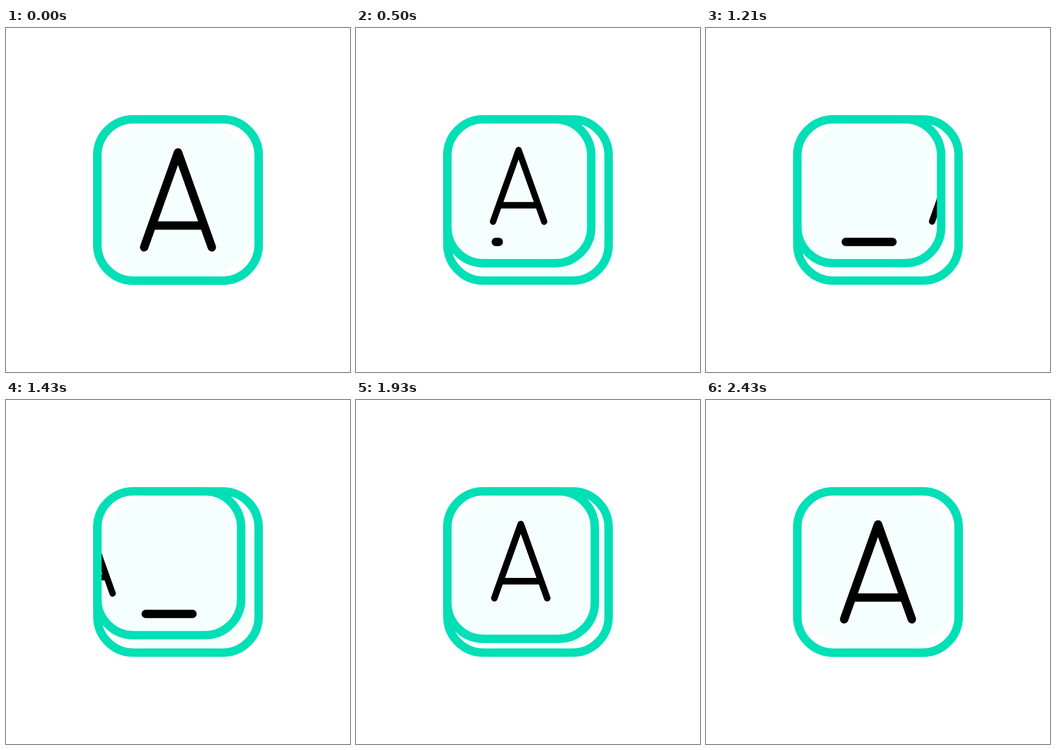
Write an HTML page with a canvas that moves like this. It is 640x640 px and loops after 2.78 s.

```html
<!DOCTYPE html>
<html lang="en">
<head>
<meta charset="utf-8">
<title>Text resize icon</title>
<style>
  html, body { margin: 0; width: 100%; height: 100%; overflow: hidden; background: #fff; }
  canvas { display: block; }
</style>
</head>
<body>
<canvas width="640" height="640"></canvas>
<script>
const ctx = document.querySelector('canvas').getContext('2d');
const LOOP = 2780, TEAL = '#00dfb6', PALE = '#f5fffd';

// Eased progress from 0 to 1 between two times
const ease = (t, start, end) => {
  const p = Math.min(1, Math.max(0, (t - start) / (end - start)));
  return (1 - Math.cos(Math.PI * p)) / 2;
};
// Rises in the first interval and falls back in the second
const pulse = (t, a, b, c, d) => ease(t, a, b) - ease(t, c, d);

function tile(size) {
  ctx.beginPath();
  ctx.roundRect(170, 170, size, size, 67);
}

function border(size) {
  tile(size);
  ctx.strokeStyle = TEAL;
  ctx.lineWidth = 15.7;
  ctx.stroke();
}

function disc() {
  ctx.beginPath();
  ctx.arc(320, 320, 158, 0, 2 * Math.PI);
  ctx.fillStyle = PALE;
  ctx.fill();
}

function letter(x, y, scale) {
  ctx.save();
  ctx.translate(x, y);
  ctx.scale(scale, scale);
  ctx.beginPath();
  ctx.moveTo(-63, 88.5);
  ctx.lineTo(0, -88);
  ctx.lineTo(63, 88.5);
  ctx.moveTo(-48, 48);
  ctx.lineTo(48, 48);
  ctx.lineWidth = 15.7;
  ctx.stroke();
  ctx.restore();
}

function underline(from, to) {
  if (to - from < 0.001) return;
  ctx.beginPath();
  ctx.moveTo(260 + 87 * from, 398);
  ctx.lineTo(260 + 87 * to, 398);
  ctx.lineWidth = 15.5;
  ctx.stroke();
}

// The letter leaves on the right, then comes back in from the left
const slide = t => t < 1290 ? 180 * ease(t, 860, 1290) : -200 * (1 - ease(t, 1290, 1720));

function draw(t) {
  const size = 300 - 32.5 * pulse(t, 0, 525, 1720, 2420);
  const shift = pulse(t, 0, 490, 1700, 2420);
  const scale = 1 - 0.248 * pulse(t, 0, 540, 1790, 2430);

  ctx.fillStyle = '#fff';
  ctx.fillRect(0, 0, 640, 640);
  disc();
  border(300);

  ctx.save();
  tile(size);
  ctx.clip();
  ctx.fillStyle = '#fff';
  ctx.fillRect(0, 0, 640, 640);
  disc();
  ctx.strokeStyle = '#000';
  ctx.lineCap = ctx.lineJoin = 'round';
  underline(ease(t, 1500, 1910), ease(t, 430, 860));
  letter(320 - 17.5 * shift + slide(t), 319.5 - 26 * shift, scale);
  ctx.restore();

  border(size);
}

function tick() {
  draw(performance.now() % LOOP);
  requestAnimationFrame(tick);
}
tick();
</script>
</body>
</html>
```
